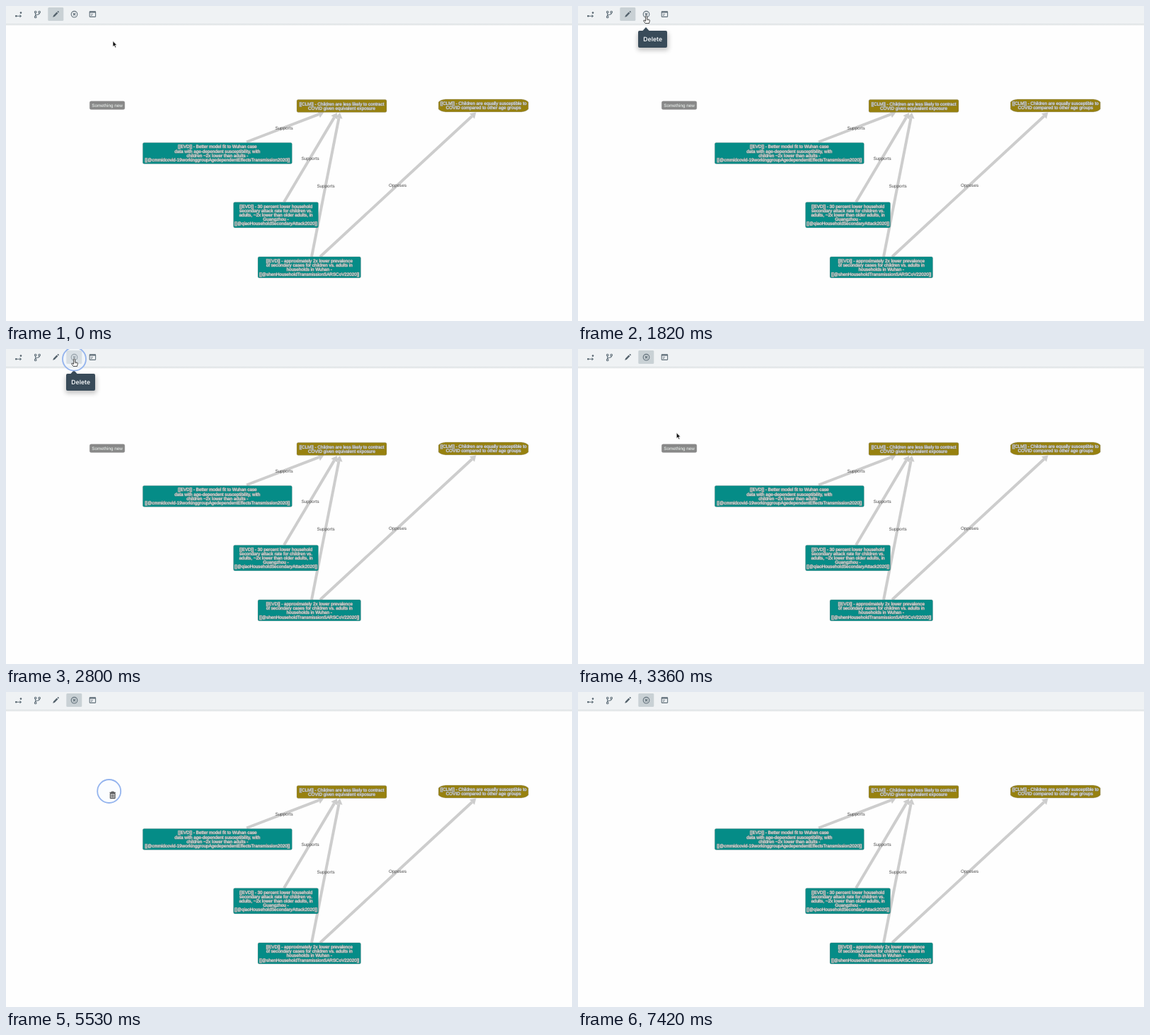
Recreate the animation shown at these times as an HTML page. Size 800 by 446 pixels, loop 7490 ms.

```html
<!DOCTYPE html>
<html lang="en">
<head>
<meta charset="utf-8">
<title>Deleting a node</title>
<style>
  html, body { margin: 0; width: 100%; height: 100%; overflow: hidden; background: #fefefe; }
  svg { display: block; width: 100vw; height: 100vh; text-rendering: geometricPrecision; }
  .label { font: 6.3px "Liberation Sans", Arial, sans-serif; text-anchor: middle; }
  .node { fill: #f6f6f6; stroke: #8b8f8c; stroke-opacity: .75; stroke-width: 1.3; paint-order: stroke; stroke-linejoin: round; }
  .tip { font: 600 8.6px Inter, sans-serif; text-anchor: middle; fill: #f3f6f8; }
  .icon { fill: none; stroke: #61707a; stroke-width: 1.1; }
  .icon .solid { fill: #56646e; stroke: none; }
</style>
</head>
<body>
<svg viewBox="0 0 800 446" xmlns="http://www.w3.org/2000/svg">
  <defs>
    <linearGradient id="shade" x2="0" y2="1">
      <stop offset="0" stop-color="#d8dde0"/>
      <stop offset="1" stop-color="#fefefe"/>
    </linearGradient>
    <filter id="soft" x="-50%" y="-50%" width="200%" height="200%">
      <feGaussianBlur stdDeviation="3"/>
    </filter>
  </defs>
  <rect width="800" height="446" fill="#fefefe"/>
  <g id="edges"></g>
  <g id="nodes"></g>

  <rect width="800" height="25" fill="#eff2f4"/>
  <rect y="25" width="800" height="3.5" fill="url(#shade)"/>
  <rect id="active" y="2" width="22" height="19" rx="1.5" fill="#c9d1d5"/>
  <g class="icon">
    <g>
      <path d="M14 14.3H21M19.5 12.7L21.3 14.3L19.5 15.9"/>
      <circle class="solid" cx="14.3" cy="14.3" r="1.3"/>
      <circle class="solid" cx="21" cy="9.6" r="1.3"/>
    </g>
    <g>
      <circle cx="41.7" cy="8.6" r="1.3"/>
      <circle cx="47.2" cy="8.6" r="1.3"/>
      <circle cx="41.7" cy="15.4" r="1.3"/>
      <path d="M41.7 10V14.1M47.2 10Q47.2 12.2 44.5 12.2Q42 12.2 41.7 13.7"/>
    </g>
    <path class="solid" d="M66.2 15.8L67.1 13.2L71.7 8.6L73.4 10.3L68.8 14.9ZM72.4 7.9L73.2 7.2Q73.9 6.9 74.6 7.7Q75 8.3 74.8 8.8L74.1 9.6Z"/>
    <g>
      <circle cx="96.5" cy="11.7" r="4.3"/>
      <path d="M94.8 10L98.2 13.4M98.2 10L94.8 13.4"/>
    </g>
    <g>
      <rect x="118.2" y="7.8" width="8.4" height="7.6" rx=".6"/>
      <path d="M118 8.7H127" stroke-width="1.8"/>
      <path d="M119.8 11.6H123M119.8 13.4H122" stroke-width=".8"/>
    </g>
  </g>

  <g id="tooltip">
    <rect x="84" y="38" width="44" height="25" rx="3" opacity=".22" filter="url(#soft)"/>
    <path d="M91 35.5L96 30L101 35.5Z" fill="#394b59"/>
    <rect x="85" y="35" width="41" height="24" rx="2" fill="#394b59"/>
    <text class="tip" x="105.7" y="50.2">Delete</text>
  </g>

  <circle id="ring" fill="#f4f8ff" fill-opacity=".35" stroke="#94b4ee" stroke-width="1.8"/>

  <g id="arrow">
    <path d="M0 0V8.2L1.9 6.5L3.3 9.6L4.7 9L3.4 6H5.8Z" fill="#111" stroke="#fff" stroke-width=".7"/>
  </g>
  <g id="hand">
    <path d="M-1 0Q0-1 1 0V4L4.2 4.8Q5 5.2 4.8 6.5L4 10H-1.4L-3.8 6.6Q-3.8 5.2-2.5 5.8L-1 7Z" fill="#fff" stroke="#222" stroke-width=".8" stroke-linejoin="round"/>
    <path d="M1 4V6M2.8 4.5V6.2" stroke="#222" stroke-width=".5"/>
  </g>
  <g id="trash" fill="none" stroke="#444">
    <path d="M.8 1.5H9.2M3.5 1.2V.4H6.5V1.2"/>
    <path d="M1.6 2.7H8.4V9.8H1.6Z" fill="#d4d4d4"/>
    <path d="M3.5 4V8.7M5 4V8.7M6.5 4V8.7" stroke-width=".7"/>
  </g>
</svg>
<script>
const LOOP = 7490, STEP = 70;
const NS = "http://www.w3.org/2000/svg";
const $ = id => document.getElementById(id);

function add(parent, tag, attrs, text) {
  const el = document.createElementNS(NS, tag);
  for (const k in attrs) el.setAttribute(k, attrs[k]);
  if (text) el.textContent = text;
  parent.appendChild(el);
  return el;
}

function addEdge(x1, y1, x2, y2, label, lx, ly) {
  const g = $("edges");
  const len = Math.hypot(x2 - x1, y2 - y1);
  const ux = (x2 - x1) / len, uy = (y2 - y1) / len;
  const bx = x2 - ux * 8, by = y2 - uy * 8;
  add(g, "path", { d: `M${x1} ${y1}L${bx} ${by}`, stroke: "#cdcdcd", "stroke-width": 4 });
  add(g, "path", {
    d: `M${x2} ${y2}L${bx - uy * 5.2} ${by + ux * 5.2}L${bx + uy * 5.2} ${by - ux * 5.2}Z`,
    fill: "#cdcdcd"
  });
  add(g, "text", { class: "label", x: lx, y: ly + 2.2, fill: "#4a4a4a" }, label);
}

function addNode(x, y, w, h, fill, lines, barrel) {
  const g = add($("nodes"), "g", {});
  const look = { fill, stroke: "#8c8c8c", "stroke-opacity": .4, "stroke-width": .8 };
  if (barrel) {
    const r = x + w, b = y + h;
    add(g, "path", {
      ...look,
      d: `M${x} ${y + 4}Q${x + 3} ${y + .6} ${x + 10} ${y}H${r - 10}Q${r - 3} ${y + .6} ${r} ${y + 4}` +
         `V${b - 4}Q${r - 3} ${b - .6} ${r - 10} ${b}H${x + 10}Q${x + 3} ${b - .6} ${x} ${b - 4}Z`
    });
  } else {
    add(g, "rect", { ...look, x, y, width: w, height: h, rx: 2 });
  }
  const top = y + h / 2 - (lines.length - 1) * 3.1 + 2.2;
  lines.forEach((s, i) => add(g, "text", { class: "label node", x: x + w / 2, y: top + i * 6.2 }, s));
  return g;
}

addEdge(340, 192.5, 449.5, 150.5, "Supports", 393, 172.7);
addEdge(393, 277.5, 468, 151, "Supports", 430, 215.6);
addEdge(432, 355, 472, 151, "Supports", 452, 254.4);
addEdge(444, 355, 664.5, 150.5, "Opposes", 553.5, 253.8);

const TEAL = "#058c87", OLIVE = "#97810f";
const doomed = addNode(118.3, 134.8, 49.5, 11.8, "#888", ["Something new"]);
addNode(411, 132.5, 127, 18, OLIVE, [
  "[[CLM]] - Children are less likely to contract",
  "COVID given equivalent exposure"]);
addNode(611.3, 132, 127, 18, OLIVE, [
  "[[CLM]] - Children are equally susceptible to",
  "COVID compared to other age groups"], true);
addNode(193.3, 193.5, 211, 30, TEAL, [
  "[[EVD]] - Better model fit to Wuhan case",
  "data with age-dependent susceptibility, with",
  "children ~2x lower than adults -",
  "[[@cmmidcovid-19workinggroupAgedependentEffectsTransmission2020]]"]);
addNode(321.5, 277.7, 120, 36.3, TEAL, [
  "[[EVD]] - 30 percent lower household",
  "secondary attack rate for children vs.",
  "adults, ~2x lower than older adults, in",
  "Guangzhou -",
  "[[@qiaoHouseholdSecondaryAttack2020]]"]);
addNode(356, 355, 145.5, 30, TEAL, [
  "[[EVD]] - approximately 2x lower prevalence",
  "of secondary cases for children vs. adults in",
  "households in Wuhan -",
  "[[@shenHouseholdTransmissionSARSCoV22020]]"]);

// Pointer path: time, x, y
const PATH = [
  [0, 151, 49.5], [980, 151, 49.5], [1280, 98.5, 12.5], [1400, 96.5, 14.5],
  [2940, 96.5, 14.5], [3360, 139.2, 118.5], [3640, 145.7, 140.8],
  [5950, 145.7, 140.8], [6720, 230, 450]
];
const PICK = 2520, DROP = 5250;

const clamp = v => Math.max(0, Math.min(1, v));
const ramp = (t, a, b) => clamp((t - a) / (b - a));
const smooth = p => p * p * (3 - 2 * p);

function pointer(t) {
  let i = 0;
  while (i < PATH.length - 2 && t >= PATH[i + 1][0]) i++;
  const [t0, x0, y0] = PATH[i], [t1, x1, y1] = PATH[i + 1];
  const p = smooth(ramp(t, t0, t1));
  return [x0 + (x1 - x0) * p, y0 + (y1 - y0) * p];
}

function show(el, on) { el.setAttribute("visibility", on ? "visible" : "hidden"); }

function draw(t) {
  const [x, y] = pointer(t);
  const kind = t >= 1330 && t < 3010 ? "hand" : t >= 3570 && t < 6020 ? "trash" : "arrow";
  for (const id of ["arrow", "hand", "trash"]) {
    show($(id), id === kind && t < 6790);
    $(id).setAttribute("transform", `translate(${x} ${y})`);
  }

  $("active").setAttribute("x", t < PICK + 70 ? 59.3 : 85.3);
  $("tooltip").setAttribute("opacity", ramp(t, 1400, 1610) * (1 - ramp(t, 2980, 3180)));
  show(doomed, t < DROP + 70);

  const age = t - (t < 4000 ? PICK : DROP);
  const ring = $("ring");
  show(ring, age >= 0 && age < 560);
  ring.setAttribute("cx", x);
  ring.setAttribute("cy", y - .3);
  ring.setAttribute("r", 6 + 10.5 * smooth(ramp(age, 0, 210)));
  ring.setAttribute("opacity", 1 - ramp(age, 300, 560));
}

const begin = performance.now();
function tick(now) {
  const t = Math.max(0, now - begin) % LOOP;
  draw(Math.floor(t / STEP) * STEP);
  requestAnimationFrame(tick);
}
tick(begin);
</script>
</body>
</html>
```
